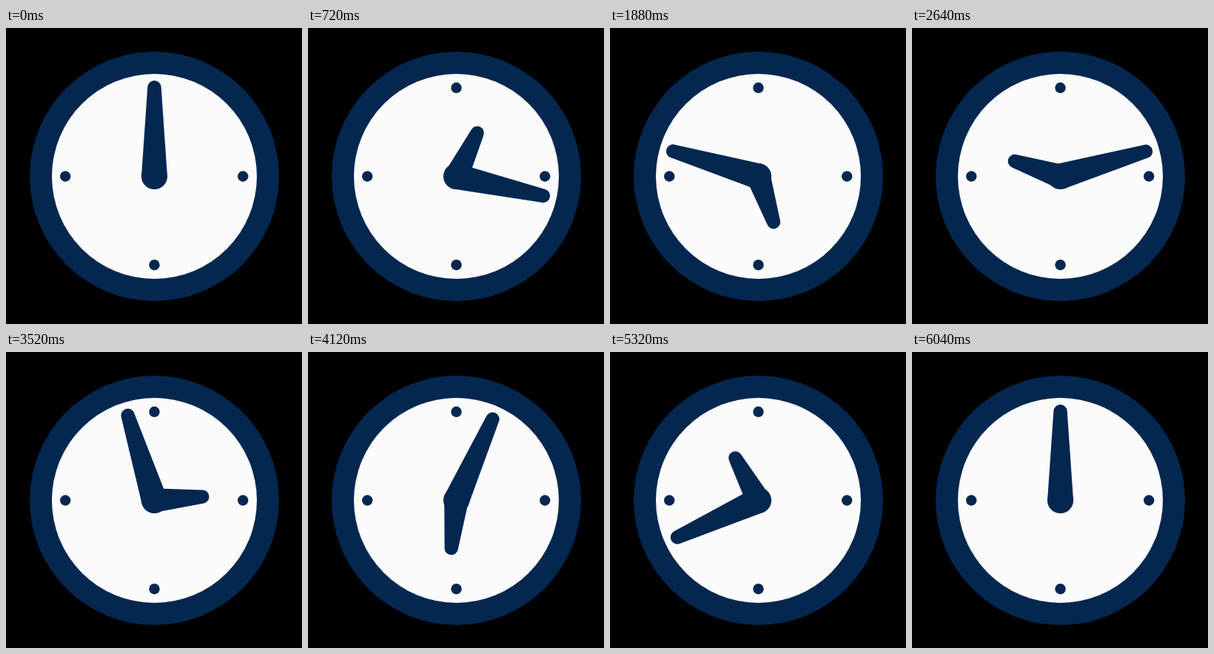
An HTML page that plays this animation: 400x400 px, repeating every 6080 ms.

```html
<!DOCTYPE html>
<html lang="en">
<head>
<meta charset="utf-8">
<title>Clock</title>
<style>
  html, body { margin: 0; width: 100%; height: 100%; overflow: hidden; background: #000; }
  svg { display: block; width: 100%; height: 100%; }
</style>
</head>
<body>
<svg viewBox="0 0 400 400">
  <g transform="translate(200.5 200.5)" fill="#03274f">
    <circle r="168.5"/>
    <circle r="138.5" fill="#fbfbfb"/>
    <circle cx="-120.3" r="7.2"/>
    <circle cx="119.7" r="7.2"/>
    <circle cy="-119.7" r="7.2"/>
    <circle cy="119.7" r="7.2"/>
    <path id="hour"/>
    <path id="minute"/>
    <circle r="17.6"/>
  </g>
</svg>
<script>
  const LOOP = 6080, STEP = 40, REST = 40, SWEEP = 6000;
  const TIP = 9.2;
  const hour = document.getElementById('hour');
  const minute = document.getElementById('minute');

  // Tapered hand pointing up, with a round tip
  const handPath = (length, base) =>
    `M${-base} 0L${-TIP} ${-length}A${TIP} ${TIP} 0 0 1 ${TIP} ${-length}L${base} 0Z`;

  const turn = (hand, degrees) => hand.setAttribute('transform', `rotate(${degrees})`);

  function render(ms) {
    const t = Math.floor((ms % LOOP) / STEP) * STEP;
    const p = Math.max(0, (t - REST) / SWEEP);
    const eased = p * p * (3 - 2 * p);
    turn(hour, 720 * eased);
    turn(minute, 2880 * eased);
  }

  hour.setAttribute('d', handPath(65, 16.4));
  minute.setAttribute('d', handPath(120.3, 17.5));

  let start;
  function tick(now) {
    start ??= now;
    render(now - start);
    requestAnimationFrame(tick);
  }
  render(0);
  requestAnimationFrame(tick);
</script>
</body>
</html>
```
